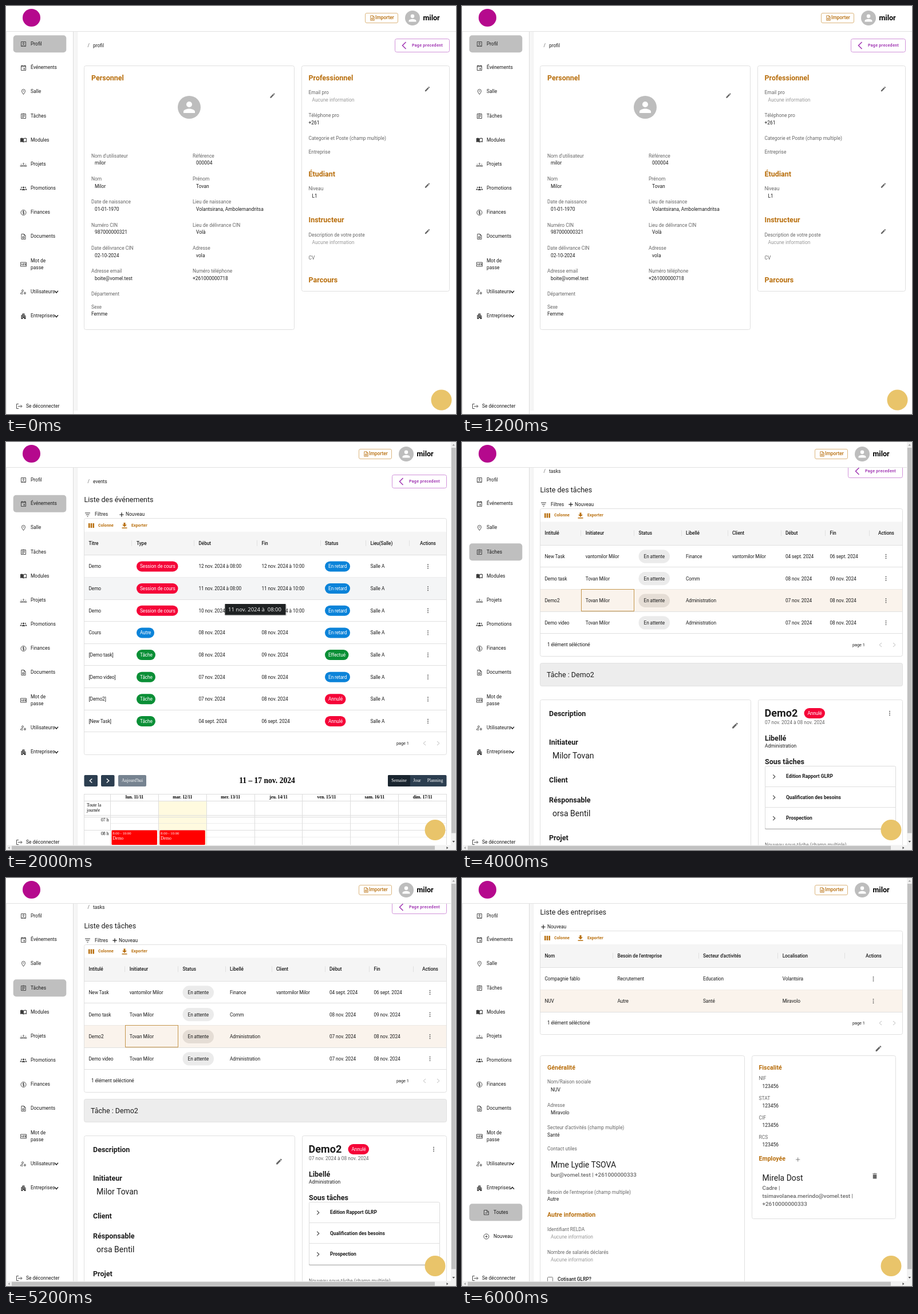
Animation of 786 by 713 pixels, one loop 8 s. Source, as an HTML page:

```html
<!DOCTYPE html>
<html lang="fr">
<head>
<meta charset="utf-8">
<title>Espace de gestion</title>
<style>
html, body { margin: 0; width: 100%; height: 100%; overflow: hidden; background: #fff; }
svg { display: block; width: 100%; height: 100%; }
text { font-family: Roboto, sans-serif; white-space: pre; }
.serif text { font-family: "Liberation Serif", serif; }
.tip { font-family: "Noto Sans", sans-serif; }
</style>
</head>
<body>
<svg id="stage" viewBox="0 0 786 713"></svg>
<script>
const INK = '#1c1c1c', GRAY = '#666', PALE = '#999', ORANGE = '#b86e0c', LINE = '#e0e0e0';
const PURPLE = '#a33bb5', RED = '#f50538', BLUE = '#0b83d9', GREEN = '#0a8f36', PENCIL = '#666';
const BODY = 8.45, HEAD = 12.5, LARGE = 14;
const CELL = { z: 8.3, ls: -0.09 };

// Icons on a 24 unit grid: [path, filled]
const ICONS = {
  profile: ['M4 4h16v16H4zM7 19c1-5 9-5 10 0M12 7a2.5 2.5 0 1 1 0 5a2.5 2.5 0 1 1 0-5'],
  event: ['M4 5h16v16H4zM4 8h16M7 2v3M17 2v3M13 14h3v3h-3z'],
  place: ['M12 21C9 17 6 13 6 9a6 6 0 0 1 12 0c0 4-3 8-6 12zM12 8a1 1 0 1 1 0 2a1 1 0 1 1 0-2'],
  task: ['M4 4h16v16H4zM7 8h10M7 12h10M7 16h7M10 3h4'],
  book: ['M1 5q6-2 11 1q5-3 11-1v14q-6-2-11 1q-5-3-11-1zm12 3v9q4-2 8-1V7q-4-1-8 1z', 1],
  team: ['M1 18c0-4 6-4 6 0zM8 18c0-6 8-6 8 0zM17 18c0-4 6-4 6 0zM12 7a1.5 1.5 0 1 1 0 3a1.5 1.5 0 1 1 0-3M4 10v2M20 10v2'],
  promo: ['M12 12a3 3 0 1 0 0-6a3 3 0 0 0 0 6zm-7-1a2 2 0 1 0 0-4a2 2 0 0 0 0 4zm14 0a2 2 0 1 0 0-4a2 2 0 0 0 0 4zM6 19c0-7 12-7 12 0zM0 18c0-4 3-5 6-4l-2 4zM24 18c0-4-3-5-6-4l2 4z', 1],
  money: ['M12 3a9 9 0 1 1 0 18a9 9 0 1 1 0-18M15 9c-1-2-6-2-6 .5s6 2 6 5s-5 3-6 .5M12 5v14'],
  file: ['M5 3h9l5 5v13H5zM14 3v5h5M9 12h6v5H9z'],
  code: ['M2 5h20v14H2zM6 9v6M10 9h3v3h-3v3h3M16 9h3v6h-3M16 12h3'],
  user: ['M9 5a3 3 0 1 1 0 6a3 3 0 1 1 0-6M11 19H2c0-5 4-6 8-5M17 14a2.5 2.5 0 1 1 0 5a2.5 2.5 0 1 1 0-5M17 12v2M17 19v2M13 16.5h1M20 16.5h1'],
  firm: ['M4 8h4V3h8v7h4v12h-6v-4h-4v4H4zm2.500 2.500v2.500h2.500v-2.500zm0 5v2.500h2.500v-2.500zm4.500-9.500v2.500h2.500V6zm0 5v2.500h2.500v-2.500zm5 2v2.500h2.500v-2.500z', 1],
  note: ['M4 4h11l5 5v11H4zM14 4v6h6M8 14h8'],
  add: ['M12 3a9 9 0 1 1 0 18a9 9 0 1 1 0-18M12 8v8M8 12h8'],
  exit: ['M10 4H3v16h7M8 12h13M17 7l5 5l-5 5'],
  edit: ['M3 17.25V21h3.75L17.8 9.9l-3.75-3.75zM20.7 7c.4-.4.4-1 0-1.4l-2.3-2.3c-.4-.4-1-.4-1.4 0L15.1 5.1l3.75 3.75z', 1],
  person: ['M12 12a4 4 0 1 0 0-8a4 4 0 0 0 0 8zM12 14c-2.7 0-8 1.3-8 4v2h16v-2c0-2.7-5.3-4-8-4z', 1],
  filter: ['M3 6h18M6 12h12M10 18h4'],
  plus: ['M12 4v16M4 12h16'],
  columns: ['M2 4h5v16H2zM9.5 4h5v16h-5zM17 4h5v16h-5z', 1],
  save: ['M9 2h6v7h5l-8 8l-8-8h5zM3 19h18v3H3z', 1],
  trash: ['M6 8h12v13H6zM5 4h4l1-1h4l1 1h4v2H5z', 1]
};

// Baselines sit on whole pixels, hairlines on half pixels
const base = y => Math.ceil(y - 0.5);
const half = v => Math.floor(v) + 0.5;

const T = (x, y, s, o = {}) =>
  `<text x="${x}" y="${base(y)}" font-size="${o.z || BODY}" font-weight="${o.w || 400}" fill="${o.c || INK}"` +
  ` text-anchor="${o.a || 'start'}" letter-spacing="${o.ls || 0}" class="${o.k || ''}">${s}</text>`;
const R = (x, y, x2, y2, fill, stroke = 'none', r = 0) =>
  `<rect x="${x}" y="${y}" width="${x2 - x}" height="${y2 - y}" rx="${r}" fill="${fill}" stroke="${stroke}"/>`;
const C = (x, y, r, fill) => `<circle cx="${x}" cy="${y}" r="${r}" fill="${fill}"/>`;
const P = (d, c, w = 1) => `<path d="${d}" fill="none" stroke="${c}" stroke-width="${w}"/>`;
const H = (x, x2, y, c = LINE) => P(`M${x} ${half(y)}H${x2}`, c);
const V = (x, y, y2, c = LINE) => P(`M${half(x)} ${y}V${y2}`, c);
const icon = (n, x, y, z = 12, c = '#3c3c3c', w = 1.8) => {
  const [d, solid] = ICONS[n];
  const paint = solid ? `fill="${c}" fill-rule="evenodd"` : `fill="none" stroke="${c}" stroke-width="${w}"`;
  return `<path transform="translate(${x - z / 2} ${y - z / 2}) scale(${z / 24})" d="${d}" ${paint}/>`;
};
const chevron = (x, y, dx, dy, c, w = 1.2) => dx
  ? P(`M${x - dx / 2} ${y - dy}L${x + dx / 2} ${y}L${x - dx / 2} ${y + dy}`, c, w)
  : P(`M${x - 3} ${y - dy / 2}L${x} ${y + dy / 2}L${x + 3} ${y - dy / 2}`, c, w);
const dots = (x, y) => [-3.2, 0, 3.2].map(d => C(x, y + d, 0.95, '#555')).join('');
const card = (x, y, x2, y2) => R(half(x), half(y), half(x2), half(y2), '#fff', LINE, 3);
const title = (x, y, s, z = HEAD, c = ORANGE) => T(x, y, s, { z, w: 700, c });
const pill = (x, y, w, s, fill) => R(x, y - 9, x + w, y + 9, fill, 'none', 9) + T(x + 6, y + 3, s, { ...CELL, c: '#fff' });
const avatar = (x, y, r) => C(x, y, r, '#bdbdbd') + icon('person', x, y, r * 1.5, '#fff');

// Label with an optional value under it; y values are text centres
const field = (x, y, label, value, y2, dx = 6) => T(x, y + 3, label, { c: GRAY }) +
  (value ? T(x + dx, y2 + 3, value, { c: value.startsWith('Aucune') ? PALE : INK }) : '');

const NAV = [
  ['Profil', 66, 'profile'], ['Événements', 107.5, 'event'], ['Salle', 149.5, 'place'],
  ['Tâches', 192, 'task'], ['Modules', 234, 'book'], ['Projets', 276.5, 'team'],
  ['Promotions', 318, 'promo'], ['Finances', 360.5, 'money'], ['Documents', 402.5, 'file'],
  ['Mot de', 445, 'code'], ['Utilisateurs', 499, 'user'], ['Entreprises', 541.5, 'firm'],
  ['Toutes', 584, 'note'], ['Nouveau', 626, 'add']
];

function sidebar(active) {
  const open = active === 12;
  let s = R(0, 45, 117, 713, '#fff') + R(118, 45, 124, 707, '#f6f6f6') +
    V(117, 45, 713, '#ddd') + V(124, 45, 707, '#f0f0f0') + V(0, 45, 713, '#e4e4e4');
  NAV.slice(0, open ? 14 : 12).forEach(([label, y, name], i) => {
    const sub = i > 11 ? 12 : 0;
    if (i === active) s += R(12.7, y - 14.7, 105.3, y + 15.2, '#bfbfbf', 'none', 5);
    s += icon(name, 30.5 + sub, i === 9 ? 451.5 : y + 0.5) + T(43 + sub, y + 3, label);
  });
  return s + T(43, 460.5, 'passe') + chevron(88, 499.5, 0, 3.5, INK, 1.3) +
    chevron(88, 542, 0, open ? -3.5 : 3.5, INK, 1.3) +
    icon('exit', 23, 699.5) + T(35, 702, 'Se déconnecter');
}

function header(dx) {
  return R(0, 0, 786, 44, '#fff') + H(0, 786, 44, '#e2e2e2') + C(44.5, 20.5, 15.5, '#b5098d') +
    `<g transform="translate(${dx} 0)">` + R(627.5, 12.5, 684.5, 29.5, '#fff', '#dcb67f', 2.5) +
    icon('file', 640, 21, 11, ORANGE) + T(645, 23.5, 'Importer', { c: ORANGE, w: 500 }) +
    avatar(710, 21, 13) + T(728.5, 25.3, 'milor', { z: HEAD, w: 700, c: '#000' }) + '</g>';
}

const crumb = (y, s, dx) => T(142.5, y + 3, '/', { c: GRAY }) + T(152, y + 3, s) +
  R(679.5 + dx, y - 11.5, 774.5 + dx, y + 11.5, '#fff', '#d193da', 3) +
  chevron(695.5 + dx, y, -6, 6, PURPLE, 1.6) +
  T(709 + dx, y + 2.5, 'Page precedent', { z: 7, w: 700, c: PURPLE, ls: 0.32 });

const tools = (y, x) => (x > 150 ? icon('filter', 142.5, y + 0.5, 12, INK) + T(155, y + 3, 'Filtres') : '') +
  icon('plus', x, y + 0.5, 11, INK, 2.6) + T(x + 7, y + 3, 'Nouveau');

const plain = (v, x, y) => T(x, y + 3, v, CELL);

// Data grid: cols are [x, label], seps are the short dividers of the head
function grid(top, bottom, cols, seps, rows, mark, markFill, dotX, cell) {
  const head = top + 23.3, first = top + 64.2, step = 38.65;
  let s = card(136.5, top, 769.5, bottom) + R(137, head, 769, first, '#f5f5f5') +
    icon('columns', 149, top + 12.5, 12, ORANGE) + icon('save', 207, top + 12.5, 12, ORANGE);
  const small = { z: 7, w: 700, c: ORANGE, ls: 0.14 };
  s += T(161, top + 14.5, 'Colonne', small) + T(219, top + 14.5, 'Exporter', small);
  cols.forEach(([x, label]) => s += T(x, head + 22.8, label, { ...CELL, w: 500 }));
  seps.forEach(x => s += V(x, head + 15, head + 25));
  s += H(137, 769, first);
  rows.forEach((row, i) => {
    const y = first + i * step, mid = y + step / 2 + 0.4;
    if (i === mark) s += R(137, y, 769, y + step, markFill);
    s += H(137, 769, y + step);
    row.forEach((v, j) => s += cell(v, cols[j][0], mid, i, j));
    s += dots(dotX, mid);
  });
  const y = bottom - 20;
  return s + T(682, y + 2.7, 'page 1', { z: 7.25 }) + chevron(731, y, -4, 3.5, '#bbb', 1) + chevron(755, y, 4, 3.5, '#bbb', 1);
}

function profile() {
  const left = [['Nom d\'utilisateur', 'milor', 'Référence', '000004'], ['Nom', 'Milor', 'Prénom', 'Tovan'],
    ['Date de naissance', '01-01-1970', 'Lieu de naissance', 'Volantsirana, Ambolemandritsa'],
    ['Numéro CIN', '987000000321', 'Lieu de délivrance CIN', 'Volà'],
    ['Date délivrance CIN', '02-10-2024', 'Adresse', 'vola'],
    ['Adresse email', 'boite@vomel.test', 'Numéro téléphone', '+261000000718']];
  let s = crumb(69, 'profil', 0) + card(136.5, 104.5, 503.5, 565.5) + card(516.5, 104.5, 774.5, 498.5) +
    title(149, 130, 'Personnel') + icon('edit', 465.5, 156.5, 11, PENCIL) + avatar(320, 177, 20);
  left.forEach(([a, b, c, d], i) => {
    const y = 261.7 + i * 40.3;
    s += field(149, y, a, b, y + 12.8) + field(326, y, c, d, y + 12.8, i === 5 ? 0 : 6);
  });
  s += field(149, 503, 'Département') + field(149, 526, 'Sexe', 'Femme', 538.5, 0);
  [['Professionnel', 130], ['Étudiant', 298.3], ['Instructeur', 378.5], ['Parcours', 483]]
    .forEach(([t, y]) => s += title(528.5, y, t));
  [145, 313.5, 394].forEach(y => s += icon('edit', 736, y, 11, PENCIL));
  return s + field(528.5, 151, 'Email pro', 'Aucune information', 164) +
    field(528.5, 191, 'Téléphone pro', '+261', 204.5, 0) +
    field(528.5, 231, 'Categorie et Poste (champ multiple)') + field(528.5, 255, 'Entreprise') +
    field(528.5, 319.5, 'Niveau', 'L1', 332.5) +
    field(528.5, 400, 'Description de votre poste', 'Aucune information', 412.7) + field(528.5, 440, 'CV');
}

function calendar() {
  const xs = [...Array(8)].map((_, i) => 182.5 + i * 83.86);
  const white = { z: 7.75, c: '#fff', a: 'middle' }, dark = '#2c3e50';
  let s = R(136.5, 582, 160, 602, dark, 'none', 2) + R(166, 582, 189.5, 602, dark, 'none', 2) +
    chevron(148.3, 592, -4, 3.5, '#fff', 1.4) + chevron(177.8, 592, 4, 3.5, '#fff', 1.4) +
    R(196, 582, 245, 602, '#768390', 'none', 2) + T(220.5, 594.5, 'Aujourd\'hui', white) +
    T(456, 596.5, '11 – 17 nov. 2024', { z: 13.55, w: 700, a: 'middle', c: '#000' }) +
    R(667, 582, 769.5, 602, dark, 'none', 2) + R(667, 582, 706, 602, '#1a252f', 'none', 2) +
    T(686.5, 594.5, 'Semaine', white) + T(718, 594.5, 'Jour', white) + T(749.5, 594.5, 'Planning', white) +
    R(xs[1], 627, xs[2], 704, '#fffadf');
  [615, 627, 652, 655, 678].forEach(y => s += H(136.5, 769.5, y, '#ddd'));
  [666.5, 690.5].forEach(y => s += `<path d="M182.5 ${y}H769.5" stroke="#ddd" stroke-dasharray="1"/>`);
  [136.5, ...xs].forEach(x => s += V(x, 615, 704, '#ddd'));
  ['lun', 'mar', 'mer', 'jeu', 'ven', 'sam', 'dim'].forEach((d, i) =>
    s += T(xs[i] + 42, 623.5, `${d}. ${11 + i}/11`, { z: 7.75, w: 700, a: 'middle', c: '#000' }));
  const small = { z: 7.75, c: '#000' };
  s += T(141, 637, 'Toute la', small) + T(141, 646, 'journée', small);
  ['07 h', '08 h'].forEach((h, i) => s += T(179.5, 663 + i * 24, h, { ...small, a: 'end' }));
  [184.5, 268.3].forEach(x => s += R(x, 678.5, x + 79.5, 704, '#f00', 'none', 1.5) +
    T(x + 1.7, 686, '8:00 - 10:00', { z: 6.6, c: '#fff' }) + T(x + 1.7, 695, 'Demo', { z: 7.75, c: '#fff' }));
  return `<g class="serif">${s}</g>`;
}

function events() {
  const cols = [[144.5, 'Titre'], [228, 'Type'], [336.5, 'Début'], [446.5, 'Fin'], [557, 'Status'], [636.5, 'Lieu(Salle)'], [723, 'Actions']];
  const lesson = d => ['Demo', 'Session de cours', `${d} nov. 2024 à 08:00`, `${d} nov. 2024 à 10:00`, 'En retard'];
  const rows = [lesson(12), lesson(11), lesson(10),
    ['Cours', 'Autre', '08 nov. 2024', '08 nov. 2024', 'En retard'],
    ['[Demo task]', 'Tâche', '08 nov. 2024', '09 nov. 2024', 'Effectué'],
    ['[Demo video]', 'Tâche', '07 nov. 2024', '08 nov. 2024', 'En retard'],
    ['[Demo2]', 'Tâche', '07 nov. 2024', '08 nov. 2024', 'Annulé'],
    ['[New Task]', 'Tâche', '04 sept. 2024', '06 sept. 2024', 'Annulé']].map(r => [...r, 'Salle A']);
  const tags = { 'Session de cours': [72.5, RED], Autre: [31, BLUE], 'Tâche': [33, GREEN],
    'En retard': [44, BLUE], 'Effectué': [41.5, GREEN], 'Annulé': [36.5, RED] };
  const cell = (v, x, y) => tags[v] ? pill(x, y, tags[v][0], v, tags[v][1]) : plain(v, x, y);
  return crumb(69, 'events', -5) + T(136.5, 105.3, 'Liste des événements', { z: HEAD }) + tools(126.5, 202) +
    grid(133.5, 546.5, cols, [219.5, 328.5, 438.5, 549, 628.5, 704.5], rows, 1, '#f4f5f6', 737, cell) +
    R(381.5, 283.5, 490.5, 304, 'rgba(0,0,0,.12)', 'none', 3) + R(382.5, 283, 488.5, 302.3, '#1f2223') +
    T(388, 296.3, '11 nov. 2024 à\u00a0 08:00', { z: 9.5, c: '#eee', k: 'tip' }) + calendar();
}

function tasks() {
  const cols = [[144.5, 'Intitulé'], [215.7, 'Initiateur'], [308.5, 'Status'], [391, 'Libellé'], [472, 'Client'], [565, 'Début'], [642.5, 'Fin'], [727, 'Actions']];
  const row = (name, by, label, client, a, b) => [name, by, 'En attente', label, client, a, b];
  const me = 'Tovan Milor', boss = 'vantomilor Milor';
  const rows = [row('New Task', boss, 'Finance', boss, '04 sept. 2024', '06 sept. 2024'),
    row('Demo task', me, 'Comm', '', '08 nov. 2024', '09 nov. 2024'),
    row('Demo2', me, 'Administration', '', '07 nov. 2024', '08 nov. 2024'),
    row('Demo video', me, 'Administration', '', '07 nov. 2024', '08 nov. 2024')];
  const cell = (v, x, y, i, j) => j === 2
    ? R(x, y - 11.7, x + 54.5, y + 11.7, i === 2 ? '#e5ddd5' : '#ebebeb', 'none', 11.7) + T(x + 9, y + 3, v, CELL)
    : plain(v, x, y);
  let s = crumb(51, 'tasks', -5) + T(136.5, 87.7, 'Liste des tâches', { z: HEAD }) + tools(108.7, 190) +
    grid(116, 374.5, cols, [207.5, 300.5, 383, 464, 557, 634.5, 711], rows, 2, '#faf3ec', 740.5, cell) +
    R(208.5, 257.5, 300.5, 295.5, 'none', '#c5964c') + plain('1 élément séléctioné', 149, 354.3) +
    R(136.5, 386.5, 769.5, 426.5, '#ededed', LINE, 3) + T(148, 411, 'Tâche : Demo2', { z: HEAD }) +
    card(136.5, 450.5, 504.5, 730) + card(517, 450.5, 769.5, 730);
  [['Description', 479], ['Initiateur', 529], ['Client', 595], ['Résponsable', 630], ['Projet', 696]]
    .forEach(([t, y]) => s += title(152, y, t, HEAD, INK));
  s += T(158, 553.5, 'Milor Tovan', { z: LARGE }) + T(158, 654.5, 'orsa Bentil', { z: LARGE }) +
    icon('edit', 477, 495.5, 13, PENCIL) + title(528.5, 479.8, 'Demo2', 18.1, INK) + pill(597.5, 474, 36.5, 'Annulé', RED) +
    dots(747, 474) + T(529, 493.5, '07 nov. 2024 à 08 nov. 2024', { c: GRAY }) +
    title(529, 522, 'Libellé', HEAD, INK) + T(529, 534.5, 'Administration') + title(529, 563.3, 'Sous tâches', HEAD, INK) +
    R(529, 568, 758, 677.2, '#c4c4c4', 'none', 2) + R(529.5, 566.5, 757.5, 675.5, '#fff', '#dcdcdc', 2);
  ['Edition Rapport GLRP', 'Qualification des besoins', 'Prospection'].forEach((t, i) => {
    const y = 584.3 + i * 36.4;
    s += chevron(545, y + 0.5, 3.5, 3.5, '#444') + title(566, y + 3, t, BODY, INK);
    if (i) s += H(529.5, 757.5, y - 18.2);
  });
  return s + T(529, 707, 'Nouveau sous-tâche (champ multiple)', { c: GRAY });
}

function firms() {
  const cols = [[144.5, 'Nom'], [271.5, 'Besoin de l\'entreprise'], [421, 'Secteur d\'activités'], [559.7, 'Localisation'], [705, 'Actions']];
  const rows = [['Compagnie fablo', 'Recrutement', 'Education', 'Volantsira'], ['NUV', 'Autre', 'Santé', 'Miravolo']];
  const bold = (x, y, s) => T(x, y, s, { z: 9.85, w: 500, c: GRAY });
  let s = T(136.5, 64, 'Liste des entreprises', { z: HEAD }) + tools(85, 142) +
    grid(92.5, 273.5, cols, [263.5, 413.5, 551.5, 668.5], rows, 1, '#faf3ec', 718.5, plain) +
    plain('1 élément séléctioné', 149, 253.5) + icon('edit', 727.5, 298, 13, PENCIL) +
    card(136.5, 310.5, 493.5, 730) + card(506, 310.5, 757.5, 595.5);
  [[149, 335, 'Généralité'], [149, 592.3, 'Autre information'], [518.5, 335, 'Fiscalité'], [518.5, 494.5, 'Employée']]
    .forEach(([x, y, t]) => s += title(x, y, t, 10.6));
  ['NIF', 'STAT', 'CIF', 'RCS'].forEach((t, i) => s += field(518.5, 350.5 + i * 34.2, t, '123456', 363.7 + i * 34.2));
  return s + field(149, 356.5, 'Nom/Raison sociale', 'NUV', 369.7) + field(149, 396.7, 'Adresse', 'Miravolo', 409.7) +
    field(149, 436.5, 'Secteur d\'activités (champ multiple)', 'Santé', 448.7, 0) + field(149, 473, 'Contact utiles') +
    T(155, 506, 'Mme Lydie TSOVA', { z: LARGE }) + bold(155, 522, 'bur@vomel.test | +261000000333') +
    field(149, 549, 'Besoin de l\'entreprise (champ multiple)', 'Autre', 561, 0) +
    field(149, 614, 'Identifiant RELDA', 'Aucune information', 627.3) +
    field(149, 654, 'Nombre de salariés déclarés', 'Aucune information', 667.3) +
    R(149.5, 697.5, 158.5, 706.5, '#fff', '#777', 1) + T(167, 704.5, 'Cotisant GLRP?', { w: 500 }) +
    icon('plus', 586.7, 492, 11, PENCIL) + T(524.5, 528.8, 'Mirela Dost', { z: LARGE }) + icon('trash', 721, 520.5, 13, PENCIL) +
    bold(524.5, 545, 'Cadre |') + bold(524.5, 559.2, 'tsimavolanea.merindo@vomel.test |') + bold(524.5, 573.5, '+2610000000333');
}

const scrollbars = () => R(777, 0, 786, 713, '#f1f1f1') + R(0, 704.5, 786, 713, '#f1f1f1') +
  R(778, 10, 785.5, 683.5, '#c1c1c1') + R(10, 705.7, 749, 712.5, '#c1c1c1') +
  '<path d="M779.5 6.5l2.3-3 2.3 3zM6.5 707l-3 2.3 3 2.3z" fill="#a3a3a3"/>' +
  '<path d="M779.5 697l2.3 3 2.3-3zM769.5 707l3 2.3-3 2.3z" fill="#505050"/>';

function scene(content, active) {
  const bars = active > 0;
  return R(0, 0, 786, 713, '#fff') + content() + sidebar(active) + header(bars ? -11 : 0) +
    (bars ? C(749.5, 678, 18, '#e9c46a') + scrollbars() : C(760.5, 688.5, 18, '#e9c46a'));
}

const scenes = [scene(profile, 0), scene(events, 1), scene(tasks, 3), scene(firms, 12)];
const stage = document.getElementById('stage');
const start = performance.now();
let shown = -1;
function draw() {
  const i = Math.floor((performance.now() - start) % 8000 / 2000);
  if (i !== shown) stage.innerHTML = scenes[shown = i];
  requestAnimationFrame(draw);
}
draw();
</script>
</body>
</html>
```
